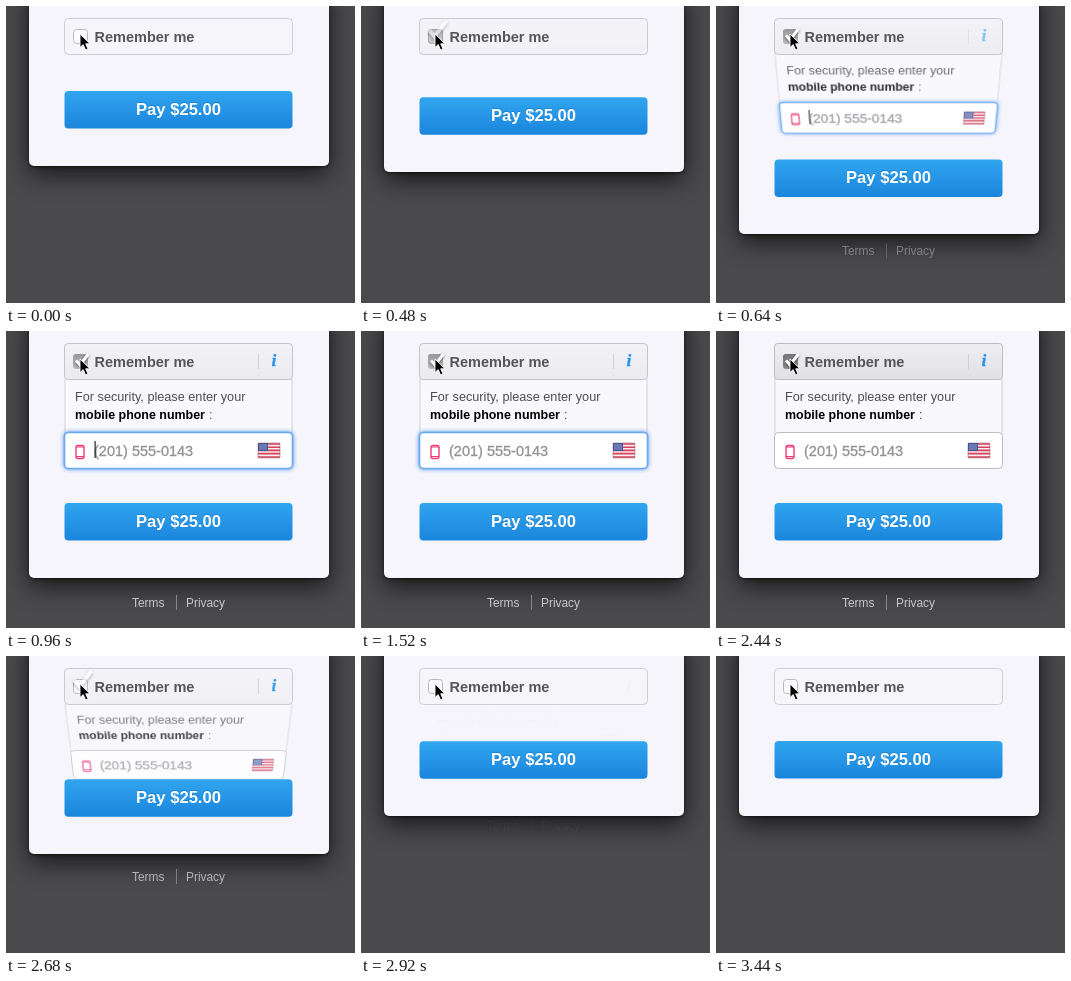
An HTML page that plays this animation: 349x297 px, repeating every 3.48 s.

```html
<!DOCTYPE html>
<html lang="en">
<head>
<meta charset="utf-8">
<title>Remember me</title>
<style>
  html, body { margin: 0; width: 100%; height: 100%; overflow: hidden; background: #4a4a4d; }
  #panel, svg { position: absolute; left: 0; top: 0; }
  #panel {
    left: 22.5px; top: -20px; width: 300px; height: 180px; border-radius: 5px;
    background: #f6f5fb; box-shadow: 0 8px 25px rgba(0, 0, 0, .7), 0 1px 3px rgba(0, 0, 0, .6);
  }
  svg { width: 349px; height: 297px; font-family: "Liberation Sans", Arial, sans-serif; }
  #details { transform-origin: 172.5px 48px; }
  .bold { font-weight: bold; }
  #glow { filter: drop-shadow(0 0 2px #4a94ee); }
  #tick { transform-origin: 75px 31px; filter: drop-shadow(0 1px 1px rgba(0, 0, 0, .5)); }
  #pay text { filter: drop-shadow(0 -1px 0 rgba(0, 40, 100, .2)); }
</style>
</head>
<body>
<div id="panel"></div>

<svg id="details" viewBox="0 0 349 297">
  <path d="M59 48V103H286V48" fill="#f9f8fc" stroke="#d2d1d7"/>
  <g font-size="12.7">
    <text x="69" y="70" fill="#4d4d50">For security, please enter your</text>
    <text x="69" y="88" class="bold" font-size="12.45">mobile phone number</text>
    <text x="203" y="88" fill="#4d4d50">:</text>
  </g>
  <rect x="58.5" y="101.5" width="228" height="36" rx="4" fill="#fff" stroke="#bdbcc3"/>
  <rect id="glow" x="58.5" y="101.5" width="228" height="36" rx="4" fill="#fff" stroke="#6ba7ee" stroke-width="1.6"/>
  <rect x="70" y="114.5" width="8" height="13" rx="2" fill="none" stroke="#ee3b78" stroke-width="1.4"/>
  <path d="M70 116H78M70 125.5H78" stroke="#ee3b78"/>
  <text x="88" y="125" font-size="14.5" fill="#939397" stroke="#939397" stroke-width=".35">(201) 555-0143</text>
  <rect id="caret" x="88.5" y="110" width="1.2" height="17" fill="#222"/>
  <rect x="252" y="112" width="22" height="15" rx="1" fill="#f6eef0"/>
  <path d="M252 113H274M252 116.2H274M252 119.4H274M252 122.6H274M252 126H274" stroke="#d9415a" stroke-width="1.6"/>
  <rect x="252" y="112" width="10" height="8" fill="#41559c"/>
  <path d="M253.5 114H261M253.5 116H261M253.5 118H261" stroke="#dfe3f4" stroke-dasharray="1 1"/>
  <rect x="252" y="112" width="22" height="15" rx="1" fill="none" stroke="#843a52" stroke-opacity=".4"/>
</svg>

<svg viewBox="0 0 349 297">
  <defs>
    <linearGradient id="blue" x2="0" y2="1"><stop stop-color="#31a5ee"/><stop offset="1" stop-color="#1a85dd"/></linearGradient>
    <linearGradient id="gray" x2="0" y2="1"><stop stop-color="#98989b"/><stop offset="1" stop-color="#bababd"/></linearGradient>
    <linearGradient id="shade" x2="0" y2="1"><stop stop-color="#efeef2"/><stop offset="1" stop-color="#dfdee3"/></linearGradient>
  </defs>

  <g id="footer" font-size="11.9" fill="#c8c8cb">
    <text x="126" y="276">Terms</text>
    <path d="M170.5 264V279" stroke="#88888b"/>
    <text x="180" y="276">Privacy</text>
  </g>

  <g id="pay">
    <rect x="58.5" y="85" width="228" height="37.5" rx="4" fill="url(#blue)"/>
    <text x="172.5" y="109" text-anchor="middle" class="bold" font-size="16.6" fill="#fff">Pay $25.00</text>
  </g>

  <rect x="58.5" y="12.5" width="228" height="36" rx="4" fill="#f6f5fa" stroke="#cfced5"/>
  <rect id="tint" x="58.5" y="12.5" width="228" height="36" rx="3" fill="url(#shade)" stroke="#bbbac0"/>
  <text x="88.5" y="36" class="bold" font-size="14.5" fill="#565659">Remember me</text>
  <g id="info">
    <path d="M252.5 23V38" stroke="#d0cfd6"/>
    <text x="268" y="35" text-anchor="middle" font-family="Liberation Serif, Times, serif" font-style="italic" class="bold" font-size="16" fill="#2494ea" stroke="#2494ea" stroke-width=".5">i</text>
  </g>

  <rect x="67.5" y="23.5" width="14" height="14" rx="3" fill="#fcfcfe" stroke="#b9b8be"/>
  <rect id="box" x="67" y="23" width="15" height="15" rx="3" fill="url(#gray)"/>
  <rect id="boxDown" x="67" y="23" width="15" height="15" rx="3" fill="#333"/>
  <path id="tick" d="M70 29.5L74 34L82.5 23" fill="none" stroke="#fff" stroke-width="3"/>
  <path d="M74 28V41.5L77.2 38.6L79.6 44L82 43L79.7 37.8H84Z" fill="#000" stroke="#fff" stroke-width=".9"/>
</svg>

<script>
const LOOP = 3480, STEP = 40, OPEN = 446, CLOSE = 2550;
const el = id => document.getElementById(id);
const clamp = v => Math.max(0, Math.min(1, v));

// CSS "ease": cubic-bezier(.25, .1, .25, 1)
function ease(x) {
  x = clamp(x);
  let lo = 0, hi = 1, s;
  const bez = (a, b) => 3 * s * (1 - s) ** 2 * a + 3 * s * s * (1 - s) * b + s ** 3;
  for (let i = 0; i < 20; i++) {
    s = (lo + hi) / 2;
    if (bez(.25, .25) < x) lo = s; else hi = s;
  }
  return bez(.1, 1);
}

// Rises to 1 after `start`, falls back to 0 after `end`
const pulse = (t, start, end, length) => ease((t - start) / length) - ease((t - end) / length);
const fade = (id, opacity) => el(id).style.opacity = opacity;

function draw(t) {
  const toggled = delay => pulse(t, OPEN + delay, CLOSE + delay, 400);
  const grow = toggled(0), tilt = toggled(32), late = toggled(80);
  const press = pulse(t, 320, OPEN, 80) + pulse(t, 2360, CLOSE - 20, 80);
  const ticked = pulse(t, OPEN, CLOSE, 250);

  el("panel").style.height = 180 + 87 * grow + "px";
  el("pay").setAttribute("transform", `translate(0 ${87 * grow})`);

  el("details").style.transform = `perspective(400px) rotateX(${-60 * (1 - tilt)}deg)`;
  fade("details", clamp(tilt * 1.2));
  fade("glow", pulse(t, OPEN, 2340, 100));
  fade("caret", t < 1100 || (t >= 1600 && t < 2100) ? 1 : 0);

  el("footer").setAttribute("transform", `translate(0 ${-87 * (1 - grow) - 16 * (1 - late)})`);
  fade("footer", late);
  fade("info", late);

  fade("tint", clamp(.45 * grow + .45 * press));
  fade("box", pulse(t, OPEN, CLOSE, 120));
  fade("boxDown", .35 * press);
  fade("tick", clamp(ticked * 3));
  el("tick").style.transform = `translateY(${-6 * (1 - ticked)}px) scale(${1 + .5 * (1 - ticked)})`;
}

function tick() {
  const t = performance.now() % LOOP;
  draw(Math.floor(t / STEP) * STEP);
  requestAnimationFrame(tick);
}
tick();
</script>
</body>
</html>
```
